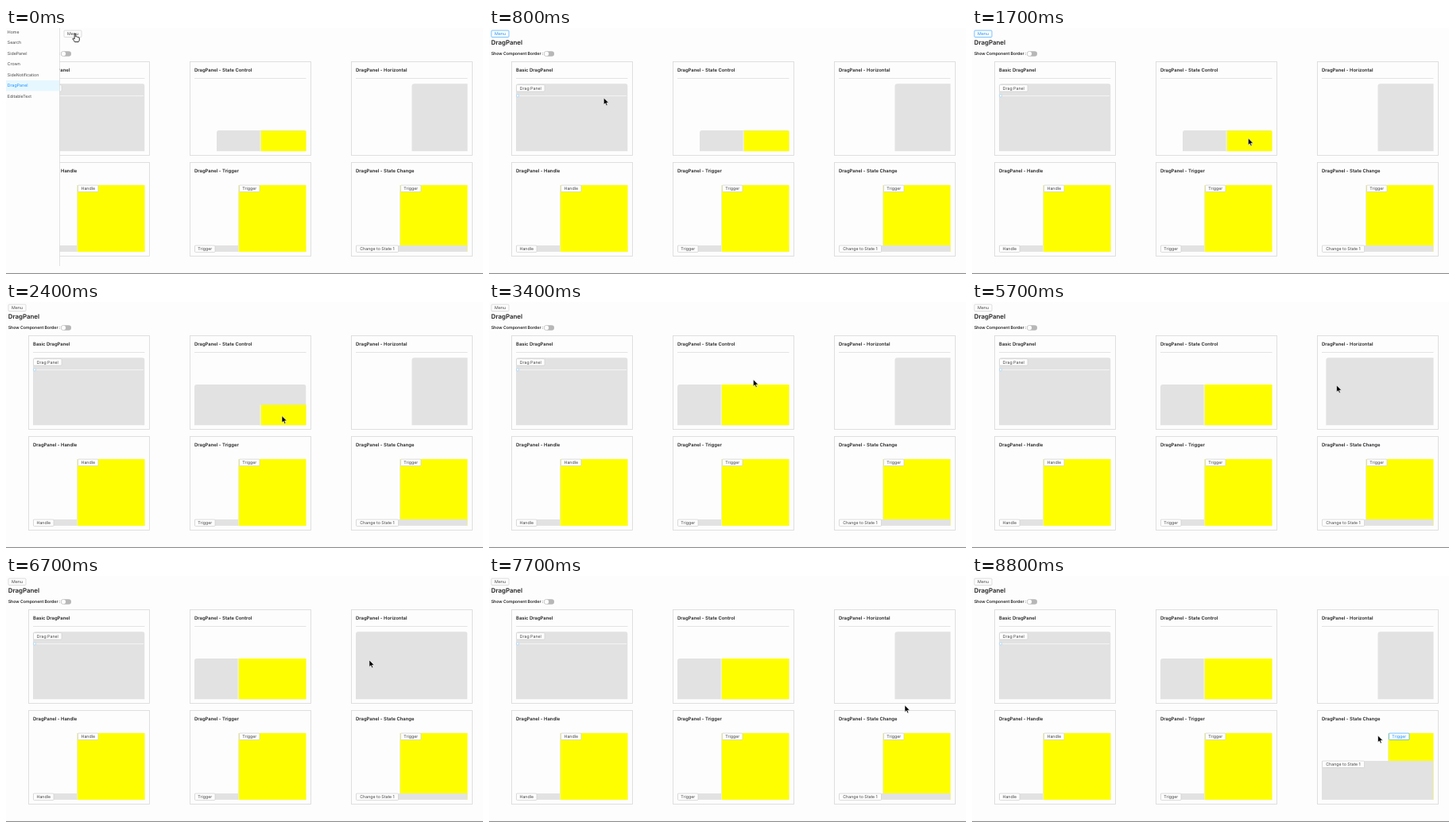
An HTML page that plays this animation: 600x310 px, repeating every 8900 ms.

```html
<!DOCTYPE html>
<html lang="en">
<head>
<meta charset="utf-8">
<title>Drag panels</title>
<style>
html, body { margin: 0; width: 100%; height: 100%; overflow: hidden; background: #fdfdfd; }
svg { display: block; width: 600px; height: 310px; }
text { font: 400 5.25px Inter, Roboto, sans-serif; fill: #444; text-rendering: geometricPrecision; }
.head { font-size: 5.9px; font-weight: 600; fill: #222; }
.title { font-size: 7.9px; font-weight: 600; fill: #222; }
.label { font-size: 5.2px; font-weight: 600; fill: #222; }
.gray { fill: #e2e2e2; }
.yellow { fill: #fefe00; }
.btn rect { fill: #fdfdfd; stroke: #cfcfcf; stroke-width: .7; }
.btn text { text-anchor: middle; }
.btn.on rect { stroke: #40a9ff; }
.btn.on text, .on { fill: #1890ff; }
</style>
</head>
<body>
<svg id="stage" viewBox="0 0 600 310"></svg>
<script>
const LOOP = 8900, STEP = 100;
const LEFT = 6, WIDE = 140.5;   // content area inside a card

const rect = (x, y, w, h, attrs = '') =>
  `<rect x="${x}" y="${y}" width="${w}" height="${h}" ${attrs}/>`;
const text = (x, y, s, cls = '') => `<text x="${x}" y="${y}" class="${cls}">${s}</text>`;
const group = (id, body, attrs = '') => `<g id="${id}" ${attrs}>${body}</g>`;
const button = (x, y, w, label, id = '') =>
  group(id, rect(.5, .5, w - 1, 8.4, 'rx="1"') + text(w / 2, 6.6, label),
    `class="btn" transform="translate(${x} ${y})"`);
const gray = (id, x, y, r = 3) => rect(x, y, WIDE, 90, `id="${id}" class="gray" rx="${r}"`);
const yellow = (id, edge) =>
  group(id, rect(-edge, 0, edge, 84, 'fill="#eeeed2"') + rect(0, 0, 90, 84, 'class="yellow"'),
    'transform="translate(62 29)"');
const clip = (name, body) => `<g clip-path="url(#${name})">${body}</g>`;

const rule = rect(LEFT, 21, WIDE, .8, 'fill="#dedede"');
// Lower cards: a yellow panel over a bar, or under it, with two buttons
const pair = (top, low, w, over, id = '') => {
  const bar = gray(id && 'rise', LEFT, 105, 0), panel = yellow(id && 'side', 1);
  return clip('low', over ? panel + bar : bar + panel) +
    button(62, 28.6, 26.5, top, id && 'trigger') + button(LEFT, 104.6, w, low, id && 'change');
};

const cards = [
  ['Basic DragPanel', rule + clip('top', gray('', LEFT, 28.2)) +
    rect(8, 43, 137, .9, 'fill="#f7f7f7"') + button(LEFT, 29.1, 36.5, 'Drag Panel') +
    rect(6.5, 41.8, 3, 3, 'rx="1" fill="#fdfdfd" stroke="#8ccbf8" stroke-width=".6"')],
  ['DragPanel - State Control', rule + clip('top', group('back', gray('backRect', 0, 0)) + yellow('front', 2))],
  ['DragPanel - Horizontal', rule + clip('top', group('slider', gray('', 0, 0)))],
  ['DragPanel - Handle', pair('Handle', 'Handle', 26.5)],
  ['DragPanel - Trigger', pair('Trigger', 'Trigger', 26.5)],
  ['DragPanel - State Change', pair('Trigger', 'Change to State 1', 54, true, 'state')]
];
const drawCard = ([name, body], i) => group('',
  rect(.5, .5, 152, 118, 'fill="none" stroke="#dcdcdc" stroke-width=".9"') +
  text(LEFT, 12.6, name, 'head') + body,
  `transform="translate(${28 + 203 * (i % 3)} ${i < 3 ? 42 : 169})"`);

const menu = ['Home', 'Search', 'SidePanel', 'Crown', 'SideNotification', 'DragPanel', 'EditableText'];

stage.innerHTML = `
<clipPath id="top">${rect(LEFT, 22, WIDE, 91.2)}</clipPath>
<clipPath id="low">${rect(LEFT, 29, WIDE, 84)}</clipPath>
${text(2.7, 21, 'DragPanel', 'title')}
${text(2.7, 34, 'Show Component Border :', 'label')}
${rect(69, 29.2, 13, 6.6, 'rx="3.3" fill="#b7b7b7"')}
<circle cx="72.4" cy="32.5" r="2.7" fill="#fdfdfd"/>
${cards.map(drawCard).join('')}
${rect(0, 308.9, 600, 1.1, 'fill="#8c8c8c"')}
${group('drawer',
  rect(0, 0, 67, 300, 'fill="#fdfdfd"') + rect(67, 0, .8, 300, 'fill="#dcdcdc"') +
  rect(0, 66, 67, 13.4, 'fill="#e6f7ff"') +
  menu.map((s, i) => text(1.8, 6.9 + 13.5 * i, s, s == 'DragPanel' ? 'on' : '')).join(''))}
${button(72.5, 2.6, 23, 'Menu', 'menuBtn')}
<path id="arrow" d="M0 0V8.6L2 6.8L3.4 9.9L4.8 9.3L3.5 6.3H6.3Z" fill="#000" stroke="#fff" stroke-width=".6"/>
<path id="hand" d="M-.8 .6Q0-.5.8.6V4Q2 3.2 2.5 4.3Q3.6 3.7 4 4.9Q5.2 4.5 5.3 5.8V8Q5 9.4 4.2 10.5H-.6Q-1.4 8.8-3.2 6.8Q-3.2 5.3-.8 6.7Z" fill="#fff" stroke="#000" stroke-width=".8"/>`;

// Eased progress from 0 to 1 between two times
const ease = (t, from, to) =>
  Math.sin(Math.PI / 2 * Math.min(1, Math.max(0, (t - from) / (to - from))));
const mix = (a, b, k) => a + (b - a) * k;

// Pointer stops: time, x, y
const stops = [
  [100, 87, 7], [800, 144.3, 88], [900, 371, 130], [1800, 347, 139], [2400, 347, 143.5],
  [3200, 335, 86], [3400, 332.4, 97.7], [3800, 567, 106], [4200, 547, 105], [4800, 543.6, 103.5],
  [5900, 455, 105], [6900, 457, 106], [7500, 523, 110], [7800, 523, 171], [8000, 514.5, 214],
  [8200, 510.5, 201]
];
function pointer(t) {
  const i = stops.findIndex(s => s[0] > t);
  const b = stops.at(i), a = stops[Math.max(0, i - 1)];
  if (i <= 0) return b.slice(1);
  const k = ease(t, a[0], b[0]);
  return [mix(a[1], b[1], k), mix(a[2], b[2], k)];
}

const byId = id => document.getElementById(id);
const move = (id, x, y) => byId(id).setAttribute('transform', `translate(${x} ${y})`);
const show = (id, on) => byId(id).setAttribute('visibility', on ? 'visible' : 'hidden');
const focus = (id, on) => byId(id).classList.toggle('on', on);

function draw(t) {
  const shut = -70 * ease(t, 0, 500);
  move('drawer', shut, 0);
  move('menuBtn', 72.5 + shut, 2.6);
  focus('menuBtn', t >= 100 && t < 1800);

  const grow = ease(t, 1800, 2300), backX = mix(34, LEFT, grow);
  move('back', backX, mix(87, 62, grow));
  byId('backRect').setAttribute('width', LEFT + WIDE - backX);
  const lift = ease(t, 2400, 3200);
  move('front', mix(90, 62, lift), mix(87.5, 62, lift));

  move('slider', mix(76.5, LEFT, ease(t, 4800, 6000) - ease(t, 6900, 7700)), 28.2);

  const state = ease(t, 8200, 8800);
  move('side', 62 + 28 * state, 29);
  move('trigger', 62 + 28 * state, 28.6);
  move('change', LEFT, 104.6 - 41 * state);
  move('rise', 0, -41 * state);
  focus('trigger', t >= 8200);

  const hand = t < 200 || (t >= 8200 && t < 8500), at = pointer(t);
  move('arrow', ...at);
  move('hand', ...at);
  show('hand', hand);
  show('arrow', !hand);
}

function tick() {
  draw(Math.floor(performance.now() % LOOP / STEP) * STEP);
  requestAnimationFrame(tick);
}
tick();
</script>
</body>
</html>
```
